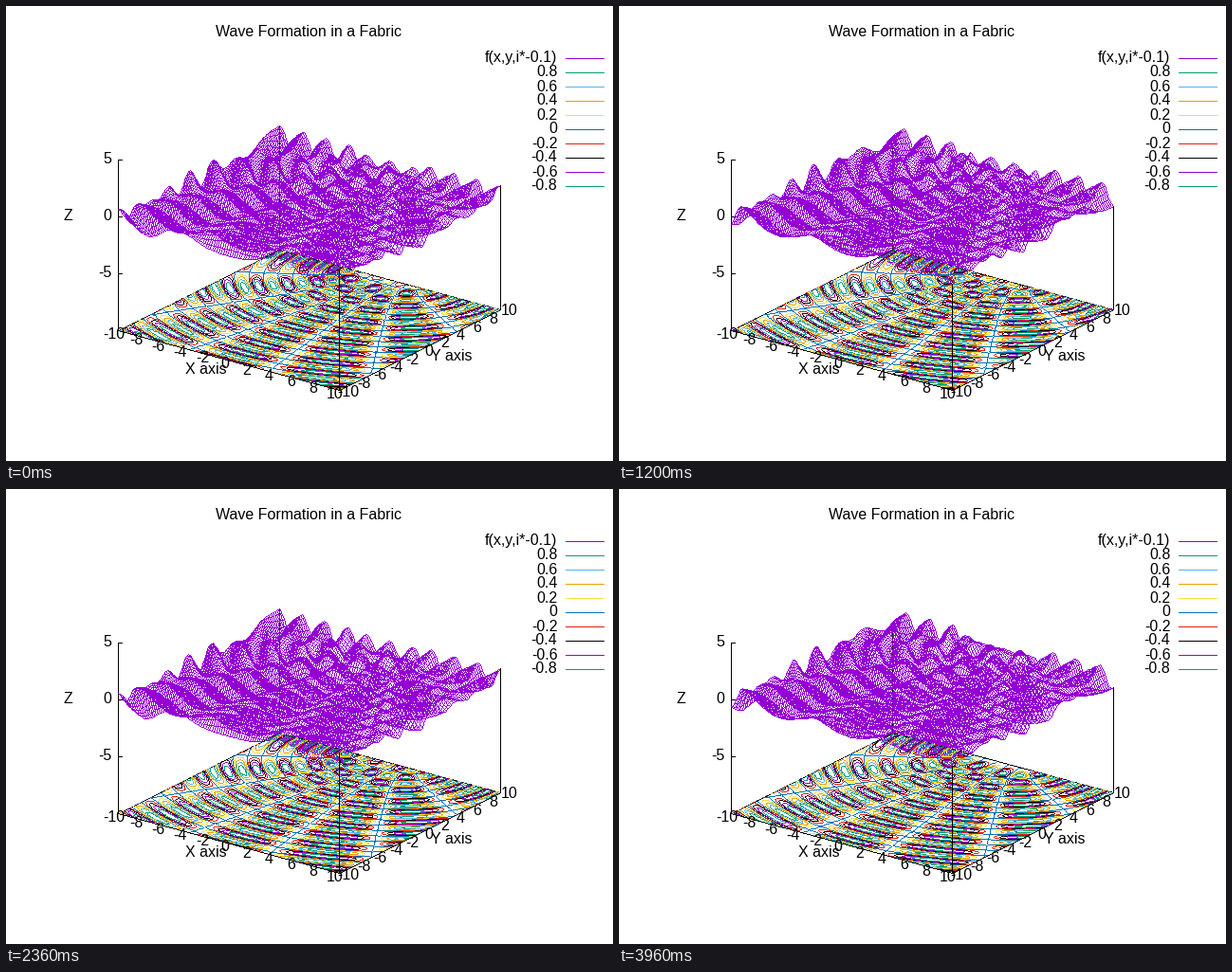
A matplotlib script that plays this animation: 640x480 px, repeating every 4000 ms.

```python
import numpy as np
import matplotlib.pyplot as plt
from matplotlib.animation import FuncAnimation
from matplotlib.colors import to_rgb

W, H, DPI = 640, 480, 100
FRAMES, INTERVAL = 100, 40
PURPLE, GREEN, SKY, ORANGE = "#9400d3", "#009e73", "#56b4e9", "#e69f00"
YELLOW, BLUE, RED, BLACK = "#f0e442", "#0072b2", "#e51e10", "#000000"
LEVEL_COLORS = [GREEN, SKY, ORANGE, YELLOW, BLUE, RED, BLACK, PURPLE, GREEN]
LEVELS = np.round(np.arange(0.8, -0.9, -0.2), 1) + 0.0
FLOOR = -10
LEFT, FRONT, RIGHT, BACK = (-10, -10), (10, -10), (10, 10), (-10, 10)

plt.rcParams["font.family"] = "Liberation Sans"
plt.rcParams["font.size"] = 16 * 72 / DPI
plt.rcParams["axes.unicode_minus"] = False

fig = plt.figure(figsize=(W / DPI, H / DPI), dpi=DPI, facecolor="white")
ax = fig.add_axes([0, 0, 1, 1])
canvas = np.full((H, W, 3), 255, np.uint8)
picture = ax.imshow(canvas, extent=(-0.5, W - 0.5, H - 0.5, -0.5),
                    interpolation="nearest", aspect="auto", zorder=1)
ax.set_autoscale_on(False)
ax.axis("off")


def project(x, y, z):
    u, v = (x + 10) / 20, (y + 10) / 20
    return 118 + 233 * u + 170 * v, 342 + 63 * u - 85 * v - 12 * (z - FLOOR)


def wave(x, y, t):
    """Two ring waves running into the points (-3, 10) and (3, 10)."""
    r1 = np.hypot(x + 3, y - 10)
    r2 = np.hypot(x - 3, y - 10)
    return (np.sin(3 * r1 + t) + np.sin(3 * r2 + t)) / 2


def nearest(p):
    return np.floor(np.asarray(p, float) + 0.5).astype(int)


def stroke(img, a, b, color=BLACK):
    """Hard one-pixel lines from points a to points b."""
    a, b = nearest(a).reshape(-1, 2), nearest(b).reshape(-1, 2)
    d = b - a
    n = np.maximum(np.abs(d).max(axis=1, keepdims=True), 1)
    k = np.arange(n.max() + 1)[:, None, None]
    p = nearest(a + d * np.minimum(k / n, 1))
    img[p[..., 1], p[..., 0]] = np.round(np.multiply(to_rgb(color), 255))


def floor_edge(img, a, b):
    stroke(img, project(*a, FLOOR), project(*b, FLOOR))


def post(img, corner, t):
    stroke(img, project(*corner, FLOOR),
           project(*corner, wave(*corner, t)))


def label(x, y, text, ha="center"):
    ax.text(x, y + 4, text, ha=ha, va="baseline", color=BLACK, zorder=2)


# Z axis and tick labels
stroke(canvas, (118, 162), (118, 342))
for v in (-5, 0, 5):
    ty = project(*LEFT, v)[1]
    stroke(canvas, (118, ty), (122, ty))
    label(110.5, ty, str(v), "right")

for v in range(-10, 11, 2):
    tx, ty = project(v, -10, FLOOR)
    label(tx - 4.5, ty + 4.5, str(v))
    tx, ty = project(10, v, FLOOR)
    label(tx + 9, ty + 2, str(v))

label(319, 28, "Wave Formation in a Fabric")
label(210, 384, "X axis")
label(469.5, 369, "Y axis")
label(64.5, 222, "Z")

# Key
names = ["f(x,y,i*-0.1)"] + [f"{v:g}" for v in LEVELS]
for k, (name, color) in enumerate(zip(names, [PURPLE] + LEVEL_COLORS)):
    ky = 55 + 15 * k
    label(581, ky, name, "right")
    stroke(canvas, (590, ky), (630, ky), color)

axis = np.linspace(-10, 10, 100)
GX, GY = np.meshgrid(axis, axis)
FX, FY = project(GX, GY, FLOOR)


def draw_surface(img, z):
    pts = np.dstack(project(GX, GY, z))
    stroke(img, pts[:, :-1], pts[:, 1:], PURPLE)
    stroke(img, pts[:-1], pts[1:], PURPLE)


def draw_contours(img, z):
    rings = ax.contour(FX, FY, z, levels=LEVELS[::-1])
    for segs, color in zip(rings.allsegs[::-1], LEVEL_COLORS):
        segs = [s for s in segs if len(s) > 1]
        if segs:
            stroke(img, np.concatenate([s[:-1] for s in segs]),
                   np.concatenate([s[1:] for s in segs]), color)
    rings.remove()


def draw(i):
    t = 0.1 * i
    z = wave(GX, GY, t)
    img = canvas.copy()
    post(img, BACK, t)
    draw_surface(img, z)
    floor_edge(img, LEFT, BACK)
    floor_edge(img, BACK, RIGHT)
    draw_contours(img, z)
    floor_edge(img, LEFT, FRONT)
    floor_edge(img, FRONT, RIGHT)
    post(img, RIGHT, t)
    post(img, FRONT, t)
    picture.set_data(img)
    return [picture]


anim = FuncAnimation(fig, draw, frames=FRAMES, interval=INTERVAL,
                     init_func=lambda: draw(0), blit=False, repeat=True,
                     repeat_delay=0)
plt.show()
```
